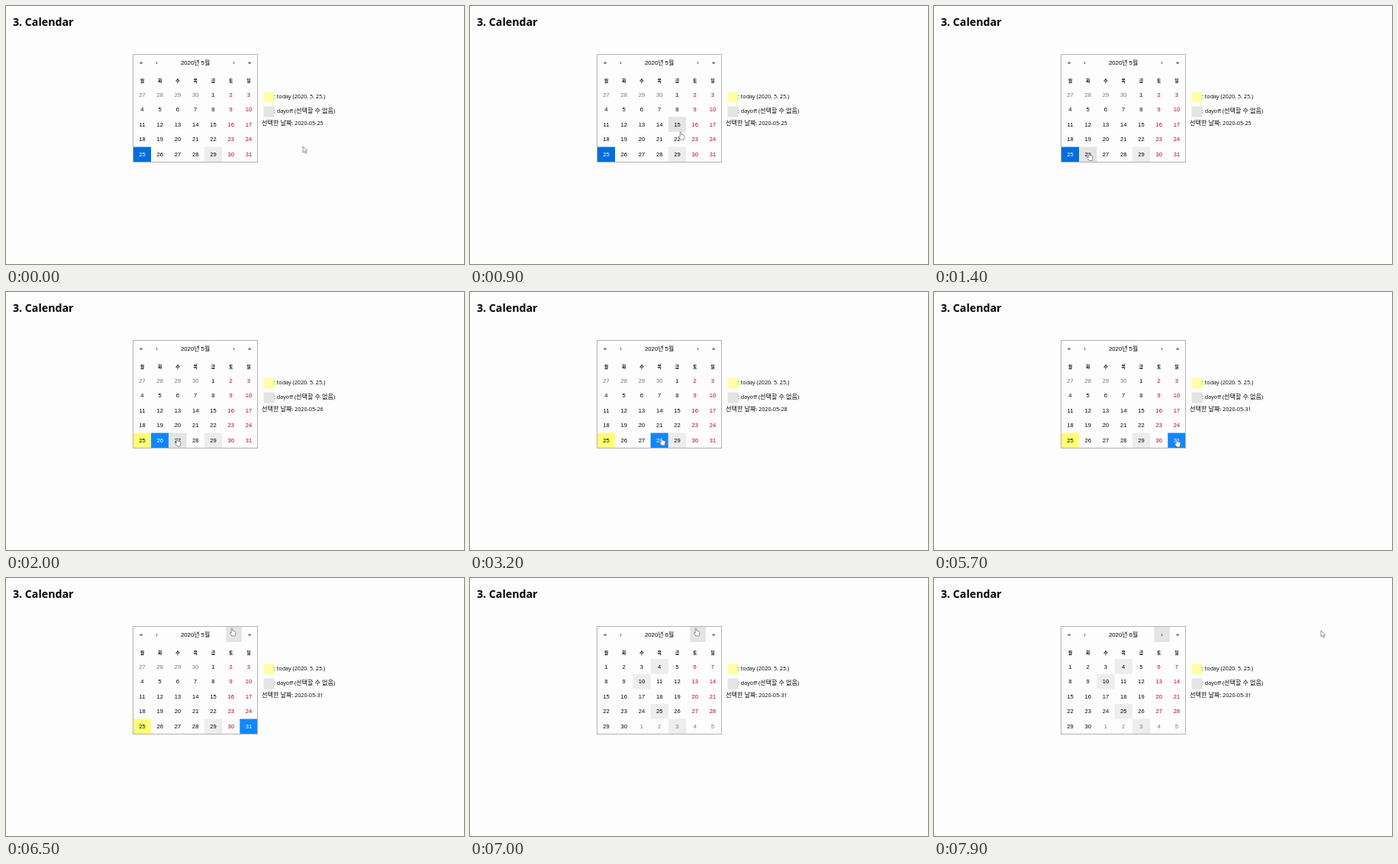
Animation of 600x338 px, one loop 8000 ms. Source, as an HTML page:

```html
<!DOCTYPE html>
<html lang="ko">
<head>
<meta charset="utf-8">
<style>
  html, body { margin: 0; width: 100%; height: 100%; overflow: hidden; background: #fdfdfd; }
  svg { display: block; width: 600px; height: 338px; }
  text { font: 7.5px "Liberation Sans", "Noto Sans CJK KR", "Noto Sans CJK", sans-serif; white-space: pre; }
  .mid { text-anchor: middle; }
  .month { font-size: 7.8px; }
  .day { font-size: 5.8px; font-weight: bold; }
  .note { font: 7.2px "Open Sans", "Noto Sans CJK KR", "Noto Sans CJK", sans-serif; }
  .ko { font-size: 8.1px; }
  .title { font: bold 14.2px "Open Sans", sans-serif; }
  .cursor { fill: #fff; stroke: #666; stroke-width: .7; stroke-linejoin: round; }
</style>
</head>
<body>
<svg id="stage" viewBox="0 0 600 338"></svg>
<script>
const LOOP = 8000, STEP = 100, TRAVEL = 400, CLICK_DELAY = 200;
const LEFT = 166.8, TOP = 106, COL = 23.25, ROW = 19.65;
const TODAY = 25, DAYOFF = 29, NEXT = "next";

// Pointer stops: arrival time, x, y, what is clicked there
const stops = [
  [0, 389, 184],
  [800, 276, 164.7],
  [1300, 203, 192, 26],
  [1900, 224, 191.5, 27],
  [2800, 251, 190.5, 28],
  [4300, 273, 192.5, DAYOFF],
  [5400, 318, 192.5, 31],
  [6400, 296, 65.5, NEXT],
  [7800, 507, 69]
];
// off: grid places of the days off
const may = { name: 5, lead: 4, prev: 30, days: 31, off: [32] };
const june = { name: 6, lead: 0, prev: 31, days: 30, off: [3, 9, 24, 32] };
const nav = [["«", 177], ["‹", 197.5], ["›", 298.6], ["»", 319.2]];
const ARROW = "M0 0V8L1.9 6.3 3.2 9 4.5 8.4 3.3 5.9H5.7Z";
const HAND = "M-.8 6V.8Q0-.4.8.8V3.6L4.1 4.4Q5 4.7 5 5.7L4.3 8.8V10.5H.3L-2.6 6.9Q-2.6 5.3-.8 6.6Z";

const rect = (x, y, w, h, fill) => `<rect x="${x}" y="${y}" width="${w}" height="${h}" fill="${fill}"/>`;
const text = (s, x, y, cls, fill = "#000") => `<text class="${cls}" x="${x}" y="${y}" fill="${fill}">${s}</text>`;
const ko = s => `<tspan class="ko">${s}</tspan>`;
const ease = k => k * k * (3 - 2 * k);

// Rests at each stop, then glides so as to arrive at the next one on time
function pointer(t) {
  const i = stops.findLastIndex(s => s[0] <= t);
  const [, x, y] = stops[i], [arrive, nx, ny] = stops[i + 1] || stops[i];
  const k = ease(Math.min(1, Math.max(0, 1 - (arrive - t) / TRAVEL)));
  return [x + (nx - x) * k, y + (ny - y) * k];
}

function hit([x, y]) {
  if (x < 167 || x > 329) return {};
  if (y > TOP && y < 204) return { tile: Math.floor((y - TOP) / ROW) * 7 + Math.floor((x - LEFT) / COL) };
  if (y > 64 && y < 84) return { nav: nav.findIndex(n => Math.abs(x - n[1]) < 10.2) };
  return {};
}

function tile(i, month, selected, focused, over) {
  const n = i - month.lead + 1, inside = n > 0 && n <= month.days;
  const label = n < 1 ? n + month.prev : inside ? n : n - month.days;
  const date = month === may && n;
  let fill = "", ink = !inside ? "#757575" : i % 7 > 4 ? "#b4001a" : "#000";
  if (month.off.includes(i)) fill = "#ededed";
  else if (date === selected) {
    fill = focused || over ? "#1087ff" : "#006edc";
    ink = "#fff";
  } else if (date === TODAY) fill = over ? "#ffffa9" : "#ffff76";
  else if (over) fill = "#e4e4e4";
  const x = LEFT + i % 7 * COL, y = TOP + Math.floor(i / 7) * ROW;
  return (fill && rect(x, y, COL, ROW, fill)) +
    text(label, x + COL / 2, y + 12.5, "mid", ink);
}

function draw(t) {
  const clicked = stops.filter(s => s[3] && s[0] + CLICK_DELAY <= t).map(s => s[3]);
  const focus = clicked.at(-1), month = focus === NEXT ? june : may;
  const selected = clicked.filter(c => c !== DAYOFF && c !== NEXT).at(-1) || TODAY;
  const tip = pointer(t), target = hit(tip);
  const over = hit(pointer(Math.max(0, t - STEP)));   // highlight trails the pointer
  const hand = target.tile >= 0 || target.nav >= 0;

  let s = text("3. Calendar", 9, 26, "title");
  nav.forEach(([mark, x], i) => {
    if (over.nav === i || (mark === "›" && focus === NEXT)) s += rect(x - 10.2, 64, 20.5, 20, "#e4e4e4");
    s += text(mark, x, 76.5, "mid");
  });
  s += text(`2020년 ${month.name}월`, 248, 76.7, "mid month");
  [..."월화수목금토일"].forEach((d, i) => s += text(d, LEFT + (i + .5) * COL, 100.3, "mid day"));
  for (let i = 0; i < 35; i++) s += tile(i, month, selected, focus === selected, over.tile === i);
  s += `<rect x="166.5" y="63.5" width="163" height="141" fill="none" stroke="#b2b2ae"/>`;

  s += rect(337.5, 112.5, 14, 14, "#ffffa8") + rect(337.5, 131.5, 14, 14, "#e4e4e4");
  s += text(": today (2020. 5. 25.)", 351, 120.6, "note");
  s += text(`: dayoff (${ko("선택할 수 없음")})`, 351, 139.5, "note");
  s += text(`${ko("선택한 날짜")}: 2020-05-${selected}`, 335, 155.8, "note");
  s += `<path class="cursor" transform="translate(${tip})" d="${hand ? HAND : ARROW}"/>`;
  stage.innerHTML = s;
}

const stage = document.getElementById("stage");
let last = -1;
function tick() {
  const t = Math.floor(performance.now() % LOOP / STEP) * STEP;
  if (t !== last) draw(last = t);
  requestAnimationFrame(tick);
}
tick();
</script>
</body>
</html>
```
